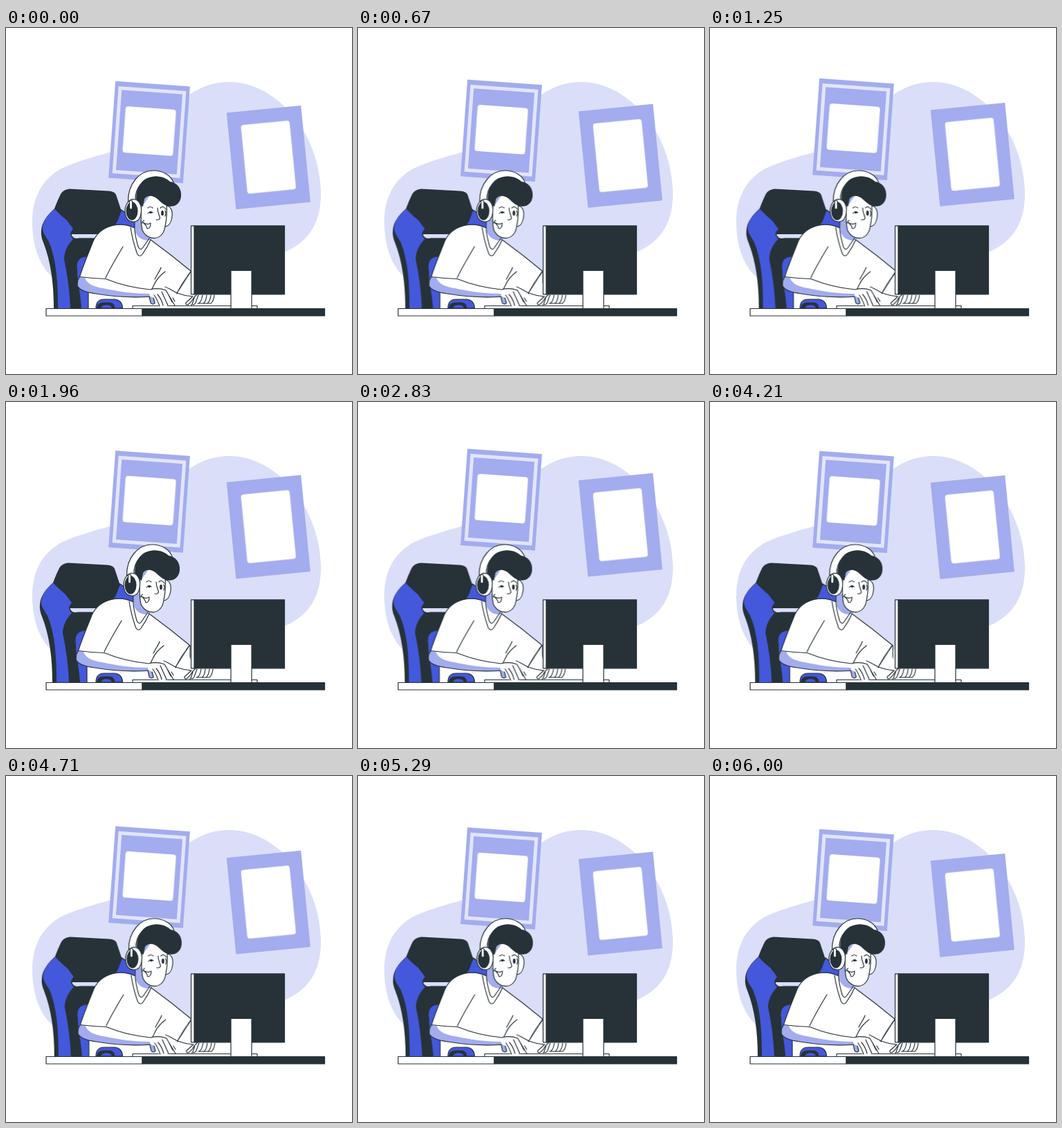
Recreate the animation shown at these times as an HTML page without scripts. Size 500 by 500 pixels, loop 6.04 s.

```html
<!DOCTYPE html>
<html lang="en">
<head>
<meta charset="utf-8">
<title>At the desk</title>
<style>
  :root {
    --ink: #263238;
    --blue: #4458db;
    --mid: #a2acee;
    --pale: #dadef8;
  }
  html, body { margin: 0; width: 100%; height: 100%; overflow: hidden; background: #fff; }
  svg { display: block; width: 100%; height: 100%; }

  .ink { fill: var(--ink); }
  .blue { fill: var(--blue); }
  .mid { fill: var(--mid); }
  .pale { fill: var(--pale); }
  .white { fill: #fff; }
  .edge, .line { stroke: var(--ink); stroke-width: 1.2; stroke-linejoin: round; stroke-linecap: round; }
  .line { fill: none; }
  .stripe { fill: none; stroke: #e2e5fa; stroke-width: 5; }

  .float { animation: float 6.04s linear infinite; }
  .shake { animation: shake 6.04s linear infinite; }

  @keyframes float {
    50% { transform: translateY(-10px); }
  }
  @keyframes shake {
    0%, 100% { transform: translateX(0); }
    10%, 90% { transform: translateX(-1px); }
    20%, 80% { transform: translateX(2px); }
    30%, 50%, 70% { transform: translateX(-4px); }
    40%, 60% { transform: translateX(4px); }
  }
</style>
</head>
<body>
<svg viewBox="0 0 500 500">
  <path class="pale" d="M38 280C38 245 52 221 75 206C95 194 130 186 155 178C200 165 230 125 264 97C284 83 304 78 323 78C355 78 385 95 405 116C437 148 455 195 455 240C455 285 434 311 402 324C360 341 300 352 240 362C170 374 100 380 66 359C46 340 38 310 38 280Z"/>

  <g class="float">
    <g transform="translate(207 150.500) rotate(4.1)">
      <rect class="mid" x="-54" y="-70" width="108" height="140"/>
      <rect class="stripe" x="-46.500" y="-60.500" width="93" height="121"/>
      <rect class="white" x="-36.500" y="-35" width="73" height="67" rx="4"/>
    </g>
    <g transform="translate(379.300 187) rotate(-5.600)">
      <rect class="mid" x="-54" y="-70" width="108" height="140"/>
      <rect class="white" x="-35.300" y="-50.200" width="70.600" height="99.600" rx="4"/>
    </g>
  </g>

  <g class="shake">
    <!-- chair -->
    <path class="ink" d="M51 292C52 280 60 270 70 261C73 253 76 246 79 240Q83 233 92 232.500L148 235.500Q157 236 159 241L166 262L187 277V405H69C69 370 65 338 54 310Q50 301 51 292Z"/>
    <path class="blue" d="M70.500 261.500C76 268 82 273 88 278L97 290Q94 294 93 297Q93 301 97 305C89 313 84 324 84 334C89 358 92 381 93 405H75C75 368 73 335 62 309C56 299 52 294 53 287C55 276 62 268 70.500 261.500Z"/>
    <path class="pale edge" d="M94 297.500H150V304H106Q98 306 94.500 300Z"/>
    <path class="blue" d="M103 350C101 336 106 330 122 330L130 405H109C108 385 103 368 103 350Z"/>
    <path class="blue edge" d="M167 263L187 277V296L155 286C163 280 162 271 167 263Z"/>

    <!-- torso -->
    <path class="white edge" d="M186 289C176 284 164 283 154 285.500C140 289 131 297 126 308C119 326 112 342 106.500 359.500L119 372V406H268V352C250 337 231 322 209 306Z"/>

    <!-- neck and collar -->
    <path class="white" d="M186 276V292L191 315Q194 322 198 316L207 303Z"/>
    <path class="mid" d="M186 276L197 277L199 293Q204 302 211 304L206 307C198 307 191 304 187 295Z"/>
    <path class="line" d="M180 288C182 302 186 316 189.500 326Q193 332 197 327C202 320 206 313 209 306M186 279V292C187 302 189 309 191 316Q194 323 198 317L207 304"/>

    <!-- folds -->
    <path class="line" d="M169 316C160 331 151 346 144 361M230 352C222 358 217 364 214 371M215 363C219 355 223 350 224 346M214 371L211 377M267 352C259 362 252 373 247 384M247 383C240 379 235 376 230 374"/>

    <!-- head -->
    <path class="white edge" d="M231 257C238 257 241 264 240 272C239 281 235 287 229 287Z"/>
    <path class="white edge" d="M197 244C195 262 194 280 197 292C201 301 209 304.500 216 303.500C224 302.500 229 295 230 286C232 277 233 267 232 255L216 238Z"/>
    <path class="mid" d="M197 242H208L199 255Z"/>
    <path class="white edge" d="M176.500 251C176 225 193 206 213 206C227 206 238 213 242 223L232 228C222 213 205 213 196 224C189 232 186 240 187 250Z"/>
    <path class="ink" d="M189 252C186 237 193 222 205 217C217 211 231 216 237 222C247 223 254 232 253 243C252 255 242 260 233 257C225 255 221 247 214 244C207 241 202 244 200 247L198 258L194 256Z"/>
    <path class="white edge" d="M185 247.500C192 248 196 256 195.500 264C195 274 191 280 184 280C176 280 172 273 172 264C172 255 178 247 185 247.500Z"/>
    <ellipse class="ink" cx="182" cy="264.500" rx="8.500" ry="13.200"/>
    <rect class="white edge" x="178.500" y="249" width="4" height="13" rx="2"/>

    <!-- face -->
    <path class="line" d="M219 260C219 267 222 271 222.500 275Q221 278 217 277M205 260Q208 257 212 260M223 260Q227 256 231 262M205 268Q208 264 212 267M230 264Q232 268 230 272"/>
    <ellipse class="ink" cx="226" cy="267.500" rx="1.900" ry="3.800"/>
    <ellipse class="ink" cx="209" cy="266.500" rx="1.900" ry="1.700"/>
    <path class="white edge" d="M198 281Q204 285 209 282Q209 290 204 290Q203 285 198 281Z"/>
    <path class="line" d="M197 282Q197 279 199.500 278"/>
  </g>

  <!-- mouse and keyboard -->
  <path class="blue edge" d="M130 405C130 397 134 392 142 392H157Q168 393 168.500 405Z"/>
  <path class="ink" d="M131.500 405C131 399 136 396.500 143 396.500H150Q157 397 157.500 405H153Q152 400.500 147 400.500H143Q138 401 137 405Z"/>
  <rect class="white edge" x="183" y="401.500" width="180" height="4"/>

  <g class="shake">
    <!-- far hand -->
    <path class="white" d="M262 358L247 383Q258 387 268 388L260 398Q262 401 266 399L271 399H295Q301 396 301 384H275Z"/>
    <path class="line" d="M247 383Q258 387 270 388L260 397Q259 400 263 400Q268 396 272 389L276 385M272 390L269 399Q272 401 274 397L278 386M278 398Q282 397 284 386M277 398H285Q289 396 290 386M285 398H291Q295 395 296 386M291 398H296Q300 395 301 386M267 352L247 383"/>

    <!-- near forearm and hand -->
    <path class="white" d="M106.500 359.500L144 362.500C165 371 187 376 208 378Q220 374 231 379L244 396L241 400L231 402H222L210 398L207 388C185 390 155 388 130 384C115 382 106 378 103.500 373Q102 366 106.500 359.500Z"/>
    <path class="mid" d="M106.500 360L114 361C117 370 127 374 140 376C162 381 186 384 207 384L208 389C185 390 155 388 130 384C115 382 106 378 103.500 373Q102 366 106.500 360Z"/>
    <path class="mid" d="M207 387L213 390L216 398Q212 402 209 397Z"/>
    <path class="line" d="M106.500 359.500Q125 362 144 362.500C165 371 187 376 208 378Q220 375 231 379L244 401M106.500 359.500Q102 366 103.500 373C106 378 115 382 130 384C155 388 185 390 207 388L209 397Q212 401 215 397L213 390M214 386Q218 391 222 402M219 385Q225 392 227 401M225 381L234 401M235 386L240 396M241 390L244 395"/>
  </g>

  <!-- monitor -->
  <rect class="white edge" x="267.500" y="285.800" width="5" height="99"/>
  <rect class="ink edge" x="272" y="285.800" width="130.500" height="99"/>
  <rect class="white edge" x="325" y="350.500" width="30" height="55"/>

  <!-- desk -->
  <rect class="white edge" x="58" y="405.500" width="139" height="10.500"/>
  <rect class="ink edge" x="197" y="405.500" width="263.500" height="10.500"/>
</svg>
</body>
</html>
```
